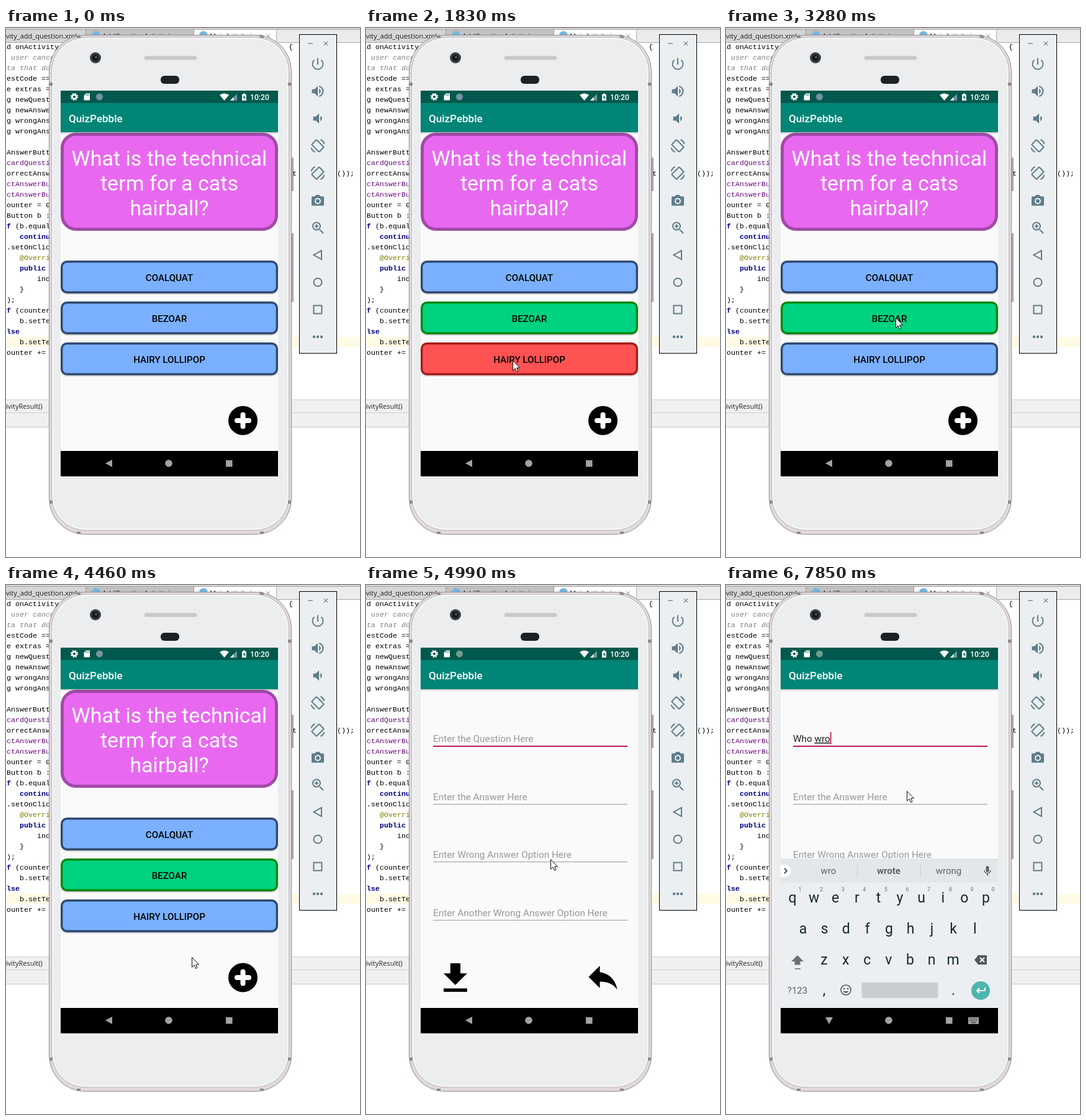
Write an HTML page that moves like this. It is 570 px wide and 853 px high and loops after 8000 ms.

```html
<!DOCTYPE html>
<html lang="en">
<head>
<meta charset="utf-8">
<title>Quiz app demo</title>
<style>
html, body { margin: 0; width: 100%; height: 100%; overflow: hidden; background: #fff; }
svg { display: block; }
text { font-family: Roboto, sans-serif; white-space: pre; }
.code text { font: 11.667px "Liberation Mono", monospace; }
.code .kw { fill: #000080; font-weight: bold; }
.code .note { fill: #808080; font-style: italic; }
.code .field { fill: #660e7a; }
.code .anno { fill: #808000; }
.ui { font: 11px "Open Sans", sans-serif; fill: #222; }
.mid { text-anchor: middle; }
.line { fill: none; stroke: #5f7d8a; stroke-width: 2; }
.hint { font-size: 15.3px; fill: #989898; }
.answer { font-size: 15.1px; font-weight: 500; text-anchor: middle; }
.draft { text-decoration: underline 1px #757575; }
</style>
</head>
<body>
<svg id="stage" width="570" height="853" viewBox="0 0 570 853"></svg>
<script>
const $ = id => document.getElementById(id);
const rect = (x, y, w, h, fill, more = '') => `<rect x="${x}" y="${y}" width="${w}" height="${h}" fill="${fill}" ${more}/>`;
const circle = (x, y, r, fill, more = '') => `<circle cx="${x}" cy="${y}" r="${r}" fill="${fill}" ${more}/>`;
const path = (d, fill, more = '') => `<path d="${d}" fill="${fill}" ${more}/>`;
const text = (x, y, s, more = '') => `<text x="${x}" y="${y}" ${more}>${s}</text>`;
const at = (x, y, s) => `<g transform="translate(${x} ${y})">${s}</g>`;
const each = (list, f) => [...list].map(f).join('');

// Code editor behind the phone: column, text, class
const code = [
  [-1, 'id onActivity'], [-1, 'e user cance', 'note'], [-1, 'ata that do', 'note'],
  [0, 'estCode =='], [-1, 'le extras ='], [-1, 'ng newQuest'], [-1, 'ng newAnswe'],
  [-1, 'ng wrongAns'], [-1, 'ng wrongAns'], [0, ''], [0, 'AnswerButt'],
  [-1, 'acardQuesti', 'field'], [-1, 'correctAnsw'], [-1, 'ectAnswerBu', 'field'],
  [-1, 'ectAnswerBu', 'field'], [-1, 'counter = 0'], [0, 'Button b :'],
  [-1, 'if (b.equal'], [3, 'continue'], [-1, 'b.setOnClic'], [3, '@Overri', 'anno'],
  [3, 'public '], [7, 'ind'], [3, '}'], [-1, '});'], [-1, 'if (counter'],
  [3, 'b.setTe'], [-1, 'else'], [3, 'b.setTe'], [-1, 'counter +=']
];
const keywords = s => s.replace(/\b(if|continue|public|else)\b/g, '<tspan class="kw">$1</tspan>');

const editor = rect(0, 0, 570, 24, '#ececec') + rect(0, 2, 128, 22, '#d6d6d6') +
  rect(128, 2, 174, 22, '#c2c2c2') + rect(302, 2, 133, 22, '#fff') +
  rect(0, 0, 570, 2, '#d9d5d6') + rect(0, 2, 570, 1, '#a5a5a5') +
  rect(0, 23, 570, 1, '#a8a8a8') + rect(128, 2, 1, 22, '#999') + rect(302, 2, 1, 22, '#999') + rect(435, 2, 1, 22, '#aaa') +
  text(0, 17, 'vity_add_question.xml', 'class="ui"') +
  circle(145, 12, 7, '#6fb7e0') + text(155, 17, 'AddQuestionActivity.java', 'class="ui"') +
  circle(318, 12, 7, '#6fb7e0') + text(328, 17, 'MainActivity.java', 'class="ui"') +
  each([116, 422], x => path(`M${x - 3} 10l6 6m0-6l-6 6`, 'none', 'stroke="#999"')) +
  rect(0, 498, 570, 16, '#fffae3') +
  '<g class="code">' + code.map(([col, s, kind = ''], i) =>
    text(1 + 7 * col, 34 + 17 * i, keywords(s), `class="${kind}"`)).join('') +
  text(455, 34, '{') + text(461, 238, 't') + text(533, 238, '());') + '</g>' +
  rect(0, 599, 570, 44, '#f0f0f0') + rect(0, 599, 570, 1, '#d0d0d0') +
  rect(0, 620, 570, 1, '#cfcfcf') + rect(0, 643, 570, 1, '#c4c4c4') +
  text(0, 614, 'ivityResult()', 'class="ui"');

const phone = rect(459, 209, 4, 54, '#aaa5a9', 'rx="1"') + rect(459, 331, 4, 111, '#aaa5a9', 'rx="1"') +
  rect(69.5, 11.5, 390, 805, '#e0d9dd', 'rx="58" stroke="#938d92"') +
  rect(73.5, 15, 382, 795, '#f5f6f7', 'rx="55" stroke="#b9b2b7"') +
  rect(76, 18, 377, 789, '#ebedef', 'rx="52"') +
  each([88, 762], y => rect(70, y, 5, 5, '#8f8a8f') + rect(454, y, 5, 5, '#8f8a8f')) +
  each([12, 812], y => rect(114, y, 6, 4, '#8f8a8f') + rect(409, y, 6, 4, '#8f8a8f')) +
  circle(144, 48, 9, '#3d4145') + circle(144, 48, 5.5, '#15181b') + circle(145, 47, 2, '#4c5963') +
  rect(222.5, 45, 85, 6.5, '#c6c8ca', 'rx="3" stroke="#dedfe0"') + rect(249, 77, 30, 13, '#1d2125', 'rx="6"');

const statusBar = rect(88, 101, 350, 20, '#00594c') +
  circle(110, 111, 3.4, 'none', 'stroke="#fff" stroke-width="2.6"') +
  circle(110, 111, 5.2, 'none', 'stroke="#fff" stroke-width="1.8" stroke-dasharray="2.1 2"') +
  path('M129 105.500h6v11h-9.500v-7.500z', '#fff') + path('M129 107v2m2-2v2m2-2v2', 'none', 'stroke="#00594c"') +
  circle(150.5, 111, 5.5, '#7892a2', 'id="sync"') +
  path('M344 108q7.500-5 15 0l-7.500 9z', '#fff') +
  path('M372 106v11h-11z', '#6f93a0', 'id="signal"') + path('M366.500 111.500v5.500h-5.500z', '#fff') +
  path('M380 107h2v-1.500h3v1.500h2v10h-7z', '#fff') + path('M384 108.500l-2.500 4h2v3l2.500-4h-2z', '#00594c') +
  text(393, 115.5, '10:20', 'font-size="12.2" font-weight="500" fill="#fff"');

const appBar = rect(88, 121, 350, 47, '#008577') +
  text(101, 151.5, 'QuizPebble', 'font-size="17.03" font-weight="500" fill="#fff"');

const answers = ['COALQUAT', 'BEZOAR', 'HAIRY LOLLIPOP'].map((s, i) => {
  const y = 375 + 66 * i;
  return rect(88.5, y + 2, 349, 53, '#000', 'rx="10" opacity=".16"') +
    rect(89.7, y + 1.7, 346.6, 49.6, '#7ab0ff', `rx="8.500" stroke="#304a70" stroke-width="3.4" id="answer${i}"`) +
    text(263, y + 32.5, s, 'class="answer"');
}).join('');

const quiz = rect(88, 168, 350, 514, '#fafafa') +
  rect(90.5, 171.5, 345, 153, '#e869f0', 'rx="22" stroke="#a24aa8" stroke-width="5"') +
  ['What is the technical', 'term for a cats', 'hairball?'].map((s, i) =>
    text(263, 222 + 39.8 * i, s, 'class="mid" font-size="34" fill="#fff"')).join('') +
  answers + circle(381.5, 633, 23.5, '#000') +
  path('M381.500 623.500v19m-9.500-9.500h19', 'none', 'stroke="#fff" stroke-width="8" stroke-linecap="round"');

const hints = ['the Question', 'the Answer', 'Wrong Answer Option', 'Another Wrong Answer Option'];
const form = '<g id="form">' + rect(88, 168, 350, 561, '#fafafa') +
  hints.map((s, i) => text(108, 253 + 93.6 * i, `Enter ${s} Here`, `class="hint" id="hint${i}"`) +
    rect(108, Math.round(259 + 93.6 * i), 313, i ? 1 : 2, i ? '#9a9a9a' : '#c2185b')).join('') +
  text(108, 253, '', 'id="typed" font-size="15.3" fill="#212121"') +
  rect(108, 237, 1.8, 20, '#d81b60', 'id="caret"') +
  path('M19 9h-4V3H9v6H5l7 7zM5 18v2h14v-2z', '#000', 'transform="translate(111.5 601.9) scale(2.7)"') +
  path('M10 9V5l-7 7 7 7v-4.100c5 0 8.500 1.600 11 5.100-1-5-4-10-11-11z', '#000', 'transform="translate(350.8 601.2) scale(2.57)"') + '</g>';

const row = (keys, x, y) => [...keys].map((c, i) =>
  text(x + 34.6 * i, y, c, 'class="mid" font-size="23" fill="#12292e"')).join('');
const keyboard = '<g id="keyboard">' + rect(88, 441, 350, 241, '#eceff1') + rect(88, 441, 350, 39, '#e4e7e9') +
  path('M88 451h7a10 10 0 0 1 0 20h-7z', '#fff') +
  path('M94 457l4 4-4 4', 'none', 'stroke="#37474f" stroke-width="1.8"') +
  each([211, 313], x => rect(x, 450, 1, 21, '#c9cdd0')) +
  [165, 262, 358.5].map((x, i) =>
    text(x, 466, '', `class="mid" id="word${i}" font-size="15" fill="#5c666b" font-weight="${i === 1 ? 700 : 400}"`)).join('') +
  rect(418.5, 453, 5, 10, '#5c666b', 'rx="2.5"') +
  path('M416 460a5 5 0 0 0 10 0m-5 5v4', 'none', 'stroke="#5c666b" stroke-width="1.5"') +
  row('qwertyuiop', 107, 511.5) + row('asdfghjkl', 124, 561.5) + row('zxcvbnm', 158, 611.5) +
  [...'1234567890'].map((c, i) => text(119 + 34.6 * i, 494, c, 'class="mid" font-size="9" fill="#667277"')).join('') +
  path('M115 597l10 10h-5.500v5.500h-9V607H105z', '#687379') + rect(111, 618, 9, 1.5, '#687379') +
  path('M400 604.500l6-7.500h14v15h-14z', '#4f5b60') +
  path('M409 601l7 7m0-7l-7 7', 'none', 'stroke="#fff" stroke-width="1.8"') +
  text(115, 659, '?123', 'class="mid" font-size="15" fill="#566268"') +
  row(',', 158, 661) + row('.', 366, 661) +
  circle(193, 653, 8, 'none', 'stroke="#4f5b60" stroke-width="1.6"') +
  circle(190, 651, 1.3, '#4f5b60') + circle(196, 651, 1.3, '#4f5b60') +
  path('M188.500 655a5 5 0 0 0 9 0z', '#4f5b60') +
  rect(218.5, 641, 123, 25, '#c9cdd0', 'rx="2"') + circle(410, 654, 15, '#4db6ac') +
  path('M417 649v5h-13m4-4l-4 4 4 4', 'none', 'stroke="#fff" stroke-width="1.8"') + '</g>';

const navIcons = path('', '#a3a3a3', 'id="back"') + circle(262, 702, 5.8, '#a3a3a3') +
  rect(354, 697, 10.5, 10.5, '#a3a3a3') +
  '<g id="switcher">' + rect(390, 697, 17, 11, '#a3a3a3', 'rx="1"') +
  path('M392 699.500h13m-13 3h13', 'none', 'stroke="#333" stroke-width="1.5" stroke-dasharray="1.500 1.200"') +
  rect(395, 705, 7, 1.3, '#333') + '</g>';

const ink = '#5f7d8a';
const line = d => path(d, 'none', 'class="line"');
const glyph = d => path(d, ink, 'transform="scale(1.05) translate(-12 -12)"');
const turn = '<rect x="-5.5" y="-8.5" width="11" height="17" rx="1" class="line" transform="rotate(-45)"/>' +
  line('M-10.500 3a10.500 10.500 0 0 0 6 7M10.500-3a10.500 10.500 0 0 0-6-7');
const tools = [
  line('M0-9.500V1M-5.500-6.500a8.500 8.500 0 1 0 11 0'),
  glyph('M3 9v6h4l5 5V4L7 9zM16.500 12c0-1.800-1-3.300-2.500-4v8c1.500-.7 2.500-2.200 2.500-4zM14 3.200v2.100a7 7 0 0 1 0 13.400v2.100a9 9 0 0 0 0-17.600z'),
  glyph('M18.500 12c0-1.800-1-3.300-2.500-4v8c1.500-.7 2.500-2.200 2.500-4zM5 9v6h4l5 5V4L9 9z'),
  turn, `<g transform="scale(-1 1)">${turn}</g>`,
  path('M-8.500-6.500h4l2-2.500h5l2 2.500h4q1.500 0 1.500 1.500V7q0 1.500-1.500 1.500h-17Q-10 8.500-10 7V-5q0-1.500 1.500-1.500z', ink) +
    circle(0, 1, 5, '#eceff1') + circle(0, 1, 3, ink),
  line('M3 3l6 6M-5-2.500h6M-2-5.500v6') + circle(-2, -2.5, 6, 'none', 'class="line"'),
  line('M6-7V7L-6.500 0z'), circle(0, 0, 6.5, 'none', 'class="line"'),
  line('M-6.500-6.500h13v13h-13z'), each([-6, 0, 6], x => circle(x, 0, 2.2, ink))
];
const toolbar = rect(472.5, 10.5, 60, 514, '#eceff1', 'stroke="#000"') +
  path('M486 25h8m18-3l6 6m0-6l-6 6', 'none', 'stroke="#78909c" stroke-width="1.3"') +
  tools.map((s, i) => at(502, 58 + 44 * i, s)).join('');

$('stage').innerHTML = '<clipPath id="screen"><rect x="88" y="101" width="350" height="622"/></clipPath>' +
  rect(0, 0, 570, 853, '#fff') + editor + phone +
  '<g clip-path="url(#screen)">' + quiz + form + statusBar + appBar +
  rect(88, 168, 350, 1, '#000', 'opacity=".22"') + rect(88, 169, 350, 2, '#000', 'opacity=".08"') +
  rect(88, 682, 350, 41, '#000') + keyboard + navIcons + '</g>' + toolbar +
  path('M.5.5V16.300L4.100 12.800 6.600 18.500 9 17.400 6.600 12H11.600z', '#fff', 'stroke="#111" id="pointer"');

// Pointer waypoints: step, x, y
const route = [
  [0, 451, 822], [5, 237, 662], [7, 237, 662], [8, 232, 610], [9, 224, 570], [10, 221, 554],
  [11, 221, 554], [12, 232, 554], [14, 236, 536], [17, 236, 536], [21, 223, 595], [23, 223, 595],
  [29, 268, 470], [32, 268, 470], [37, 276, 465], [40, 276, 465], [41, 330, 540], [42, 372, 629],
  [43, 388, 622], [45, 388, 622], [47, 376, 617], [48, 376, 617], [49, 362, 618], [51, 299, 600],
  [58, 297, 442], [59, 295, 376], [60, 291, 332], [104, 291, 332]
];
// Typed text: step, finished words, word in progress, suggestions
const typing = [
  [0, '', '', 'I The What'], [76, '', 'W', 'W We What'], [80, '', 'Who', 'Who Who’s What'],
  [82, 'Who\u00a0', '', 'is was are'], [92, 'Who\u00a0', 'w', 'w was will'],
  [94, 'Who\u00a0', 'wr', 'wr wrote wrong'], [95, 'Who\u00a0', 'wro', 'wro wrote wrong']
];
const colors = { plain: ['#7ab0ff', '#304a70'], right: ['#00d37f', '#0b870b'], wrong: ['#ff5252', '#a51d1d'] };
const show = (id, on) => $(id).setAttribute('visibility', on ? 'visible' : 'hidden');
const clamp = v => Math.max(0, Math.min(1, v));

function paint(i, state) {
  const [fill, stroke] = colors[state];
  $('answer' + i).setAttribute('fill', fill);
  $('answer' + i).setAttribute('stroke', stroke);
}

function pointerAt(step) {
  const i = Math.max(1, route.findIndex(p => p[0] >= step));
  const [a, b] = [route[i - 1], route[i]];
  const f = clamp((step - a[0]) / (b[0] - a[0]));
  return [1, 2].map(n => Math.round(a[n] + (b[n] - a[n]) * f));
}

function draw(time) {
  const step = Math.floor((time - 508) / 77.2);
  const within = (a, b) => step >= a && step < b;

  show('pointer', step >= 0);
  $('pointer').setAttribute('transform', `translate(${pointerAt(step)})`);

  const missed = within(15, 23);
  paint(1, missed || step >= 33 ? 'right' : 'plain');
  paint(2, missed ? 'wrong' : 'plain');

  const opened = clamp((step - 51) / 4);
  $('form').setAttribute('opacity', clamp(opened * 1.4));
  $('form').setAttribute('transform', `translate(0 ${47 * (1 - opened) ** 3})`);
  $('sync').setAttribute('fill', opened ? '#6f9b8c' : '#7892a2');
  $('signal').setAttribute('fill', opened ? '#669b8e' : '#6f93a0');

  const [, done, word, guesses] = typing.findLast(p => p[0] <= Math.max(0, step));
  show('hint0', !(done + word));
  $('typed').innerHTML = `${done}<tspan class="draft">${word}</tspan>`;
  $('caret').setAttribute('x', 108 + (done + word ? $('typed').getComputedTextLength() : 0));
  show('caret', within(63, 69) || within(76, 88) || step >= 92);
  guesses.split(' ').forEach((s, i) => $('word' + i).textContent = s);

  const raised = clamp((step - 76) / 4);
  $('keyboard').setAttribute('opacity', raised);
  $('keyboard').setAttribute('transform', `translate(0 ${120 * (1 - raised)})`);
  show('switcher', raised);
  $('back').setAttribute('d', raised ? 'M160 697h12l-6 11z' : 'M171 696v12l-11-6z');
}

const start = performance.now();
function tick() {
  draw((performance.now() - start) % 8000);
  requestAnimationFrame(tick);
}
tick();
</script>
</body>
</html>
```
